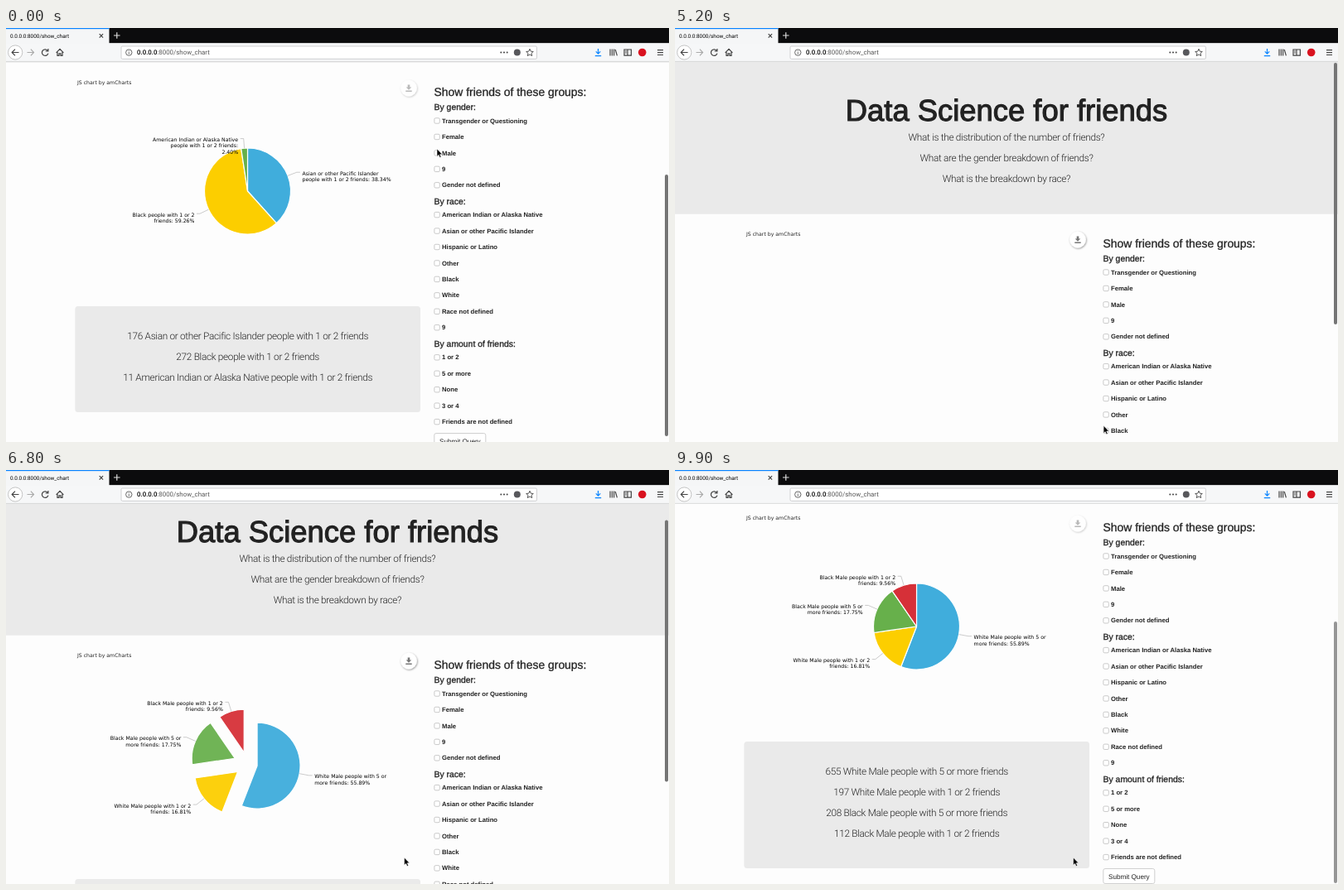
An HTML page that plays this animation: 800x500 px, repeating every 10 s.

```html
<!DOCTYPE html>
<html lang="en">
<head>
<meta charset="utf-8">
<title>Data Science for friends</title>
<style>
  html, body { margin: 0; width: 100%; height: 100%; overflow: hidden; background: #fff; }
  svg { display: block; width: 100%; height: 100%; }
  text { font-family: "Liberation Sans", Arial, sans-serif; fill: #222; text-rendering: geometricPrecision; }
  .medium { stroke: #222; stroke-width: .3px; }
  .title { font-size: 36.4px; stroke-width: 1.1px; }
  .bold { font-size: 7.7px; font-weight: 700; }
  .light { font: 300 11.8px Roboto, sans-serif; letter-spacing: -.3px; text-anchor: middle; }
  .chart { font: 6.2px "DejaVu Sans", Verdana, sans-serif; fill: #000; }
  .ui { font-family: Roboto, sans-serif; fill: #000; }
  .icon { fill: none; stroke: #444; stroke-width: 1.2; }
</style>
</head>
<body>
<svg id="stage" viewBox="0 0 800 500">
  <defs>
    <clipPath id="view"><rect y="40" width="800" height="460"/></clipPath>
    <clipPath id="chartArea"><rect x="83" y="241" width="417" height="278"/></clipPath>
    <filter id="shadow" x="-30%" y="-30%" width="160%" height="160%">
      <feDropShadow dx=".7" dy=".9" stdDeviation=".8" flood-opacity=".45"/>
    </filter>
  </defs>
  <rect width="800" height="500" fill="#fdfdfd"/>
  <g clip-path="url(#view)"><g id="page"></g></g>
  <rect id="thumb" x="795" width="4" height="316" rx="2" fill="#757575"/>

  <g id="browser">
    <rect width="800" height="18.5" fill="#0c0c0d"/>
    <rect width="124.5" height="19" fill="#f5f6f7"/>
    <rect width="124.5" height="1.2" fill="#0a84ff"/>
    <rect y="18.3" width="800" height="22" fill="#f6f7f8"/>
    <path d="M0 40.4H800" stroke="#cfcfcf" stroke-width=".7"/>
    <text class="ui" x="5" y="11.8" font-size="6.42">0.0.0.0:8000/show_chart</text>
    <path class="icon" d="M112.7 7.2l4.4 4.4m0-4.4l-4.4 4.4" stroke-width=".9"/>
    <path class="icon" d="M130 9h7.6M133.8 5.2v7.6" style="stroke:#ddd"/>
    <circle cx="11.2" cy="29.5" r="8.6" fill="#fff" stroke="#b5b5b5" stroke-width=".8"/>
    <path class="icon" d="M15.5 29.5H7.2m3.8-3.8l-3.8 3.8 3.8 3.8"/>
    <path class="icon" d="M25.5 29.5h8m-3.6-3.8l3.6 3.8-3.6 3.8" style="stroke:#aaa"/>
    <path class="icon" d="M50.2 27.3a3.8 3.8 0 1 0 .7 3.3M50.9 25v3h-3.2"/>
    <path class="icon" d="M60.6 29.8l4.4-4.4 4.4 4.4M62 29v4.4h2v-2.6h2v2.6h2V29"/>
    <rect x="139" y="22" width="501.5" height="15.4" rx="1.6" fill="#fff" stroke="#c5c5c7" stroke-width=".8"/>
    <g class="icon" style="stroke-width:.8"><circle cx="148.3" cy="29.6" r="3.7"/><path d="M148.3 29.1v2.6m0-4.3v.9"/></g>
    <text class="ui" x="158" y="32.4" font-size="7.87"><tspan font-weight="500">0.0.0.0</tspan><tspan fill="#555">:8000/show_chart</tspan></text>
    <path d="M597.3 29.6h.01M601 29.6h.01M604.7 29.6h.01" stroke="#444" stroke-width="2" stroke-linecap="round"/>
    <circle cx="616.8" cy="29.5" r="4" fill="#58585c"/>
    <path class="icon" style="stroke-width:.9" d="M632 25.3l1.3 2.9 3 .3-2.3 2 .7 3.1-2.7-1.6-2.7 1.6.7-3.1-2.3-2 3-.3z"/>
    <path class="icon" style="stroke:#0a84ff" d="M714.5 25v6m-2.7-2.6l2.7 2.7 2.7-2.7M710.8 33.6h7.4"/>
    <path class="icon" d="M729 25.6v8M731.4 25.6v8M733.6 25.6v8M735.2 26l2.2 7.4"/>
    <path class="icon" d="M746 26h8.4v7.2H746zM750 26v7.2M747.2 28h1.6m-1.6 2h1.6"/>
    <circle cx="767.7" cy="29.5" r="4.8" fill="#d9121f"/>
    <path class="icon" d="M786 26.7h7m-7 2.9h7m-7 2.9h7"/>
  </g>
  <path id="cursor" d="M0 0V9.2L2.1 7.3 3.5 10.5 5.1 9.8 3.7 6.7H6.5Z" fill="#000" stroke="#fff" stroke-width=".6"/>
</svg>

<script>
const LOOP = 10000, STEP = 100, RELOAD = 5000;
const PIE = { x: 291.5, y: 380, r: 52, label: 63.6 };
const BLUE = '#40addc', YELLOW = '#fcce00', GREEN = '#67b04b', RED = '#d63038';
const $ = id => document.getElementById(id);

function add(parent, tag, attrs = {}, content = '') {
  const node = document.createElementNS('http://www.w3.org/2000/svg', tag);
  for (const key in attrs) node.setAttribute(key, attrs[key]);
  node.textContent = content;
  return parent.appendChild(node);
}
const write = (parent, x, y, cls, content, more = {}) =>
  add(parent, 'text', { x, y, class: cls, ...more }, content);

// Interpolates rows of [time, ...values], holding both ends.
function track(rows, time, ease = u => u) {
  const next = rows.findIndex(row => row[0] > time);
  if (next < 0) return rows[rows.length - 1].slice(1);
  if (next === 0) return rows[0].slice(1);
  const a = rows[next - 1], b = rows[next];
  const u = ease((time - a[0]) / (b[0] - a[0]));
  return a.slice(1).map((v, i) => v + (b[i + 1] - v) * u);
}
const smooth = u => u * u * (3 - 2 * u);

function bounce(u) {
  if (u <= 0) return 0;
  if (u >= 1) return 1;
  const k = 7.5625, d = 2.75;
  if (u < 1 / d) return k * u * u;
  if (u < 2 / d) return k * (u - 1.5 / d) ** 2 + .75;
  if (u < 2.5 / d) return k * (u - 2.25 / d) ** 2 + .9375;
  return k * (u - 2.625 / d) ** 2 + .984375;
}

const page = $('page');

// Header
add(page, 'rect', { y: 40, width: 800, height: 184.7, fill: '#eaeaea' });
write(page, 400, 111.5, 'medium title', 'Data Science for friends', { 'text-anchor': 'middle' });
['What is the distribution of the number of friends?',
 'What are the gender breakdown of friends?',
 'What is the breakdown by race?']
  .forEach((line, i) => write(page, 400, 136 + 25 * i, 'light', line));

// Query form
const boxes = {};
function formGroup(title, headY, firstY, labels) {
  write(page, 516.6, headY, 'medium', title, { 'font-size': 10.4 });
  labels.forEach((label, i) => {
    const y = firstY + 19.45 * i;
    add(page, 'rect', { x: 516.9, y: y - 3.2, width: 6.4, height: 6.4, rx: 1.4, fill: '#fff', stroke: '#b4b4b4', 'stroke-width': .7 });
    const mark = add(page, 'g', { visibility: 'hidden' });
    add(mark, 'rect', { x: 516.6, y: y - 3.5, width: 7, height: 7, rx: 1.5, fill: '#1685f5' });
    add(mark, 'path', { d: `M518.2 ${y + .2}l1.4 1.6 2.5-3.6`, fill: 'none', stroke: '#fff', 'stroke-width': 1 });
    boxes[label] = mark;
    write(page, 526, y + 2.6, 'bold', label);
  });
}
write(page, 516.6, 264.5, 'medium', 'Show friends of these groups:', { 'font-size': 13.9 });
formGroup('By gender:', 282, 295,
  ['Transgender or Questioning', 'Female', 'Male', '9', 'Gender not defined']);
formGroup('By race:', 395.6, 408.6,
  ['American Indian or Alaska Native', 'Asian or other Pacific Islander', 'Hispanic or Latino',
   'Other', 'Black', 'White', 'Race not defined', '9']);
formGroup('By amount of friends:', 567.6, 580.8,
  ['1 or 2', '5 or more', 'None', '3 or 4', 'Friends are not defined']);
add(page, 'rect', { x: 516.8, y: 672.5, width: 62, height: 18, rx: 2.3, fill: '#fff', stroke: '#c4c4c4', 'stroke-width': .8 });
write(page, 523, 684.7, '', 'Submit Query', { 'font-size': 8.15 });

// One query result: pie chart plus summary box
function result(slices, summary, boxHeight) {
  const root = add(page, 'g');
  const chart = add(root, 'g', { 'clip-path': 'url(#chartArea)' });
  let from = 0;
  const parts = slices.map(([percent, color, lines]) => {
    const to = from + percent / 100;
    const dir = turn => [Math.sin(turn * 2 * Math.PI), -Math.cos(turn * 2 * Math.PI)];
    const at = (turn, r) => dir(turn).map((v, i) => (i ? PIE.y : PIE.x) + v * r);
    const mid = (from + to) / 2, side = mid < .5 ? 1 : -1;
    const group = add(chart, 'g');
    const wedge = add(group, 'path', {
      d: `M${PIE.x} ${PIE.y}L${at(from, PIE.r)}A${PIE.r} ${PIE.r} 0 ${+(percent > 50)} 1 ${at(to, PIE.r)}Z`,
      fill: color, stroke: '#fff', 'stroke-width': 1.2, 'stroke-linejoin': 'round'
    });
    const [x, y] = at(mid, PIE.label);
    add(group, 'path', { d: `M${at(mid, PIE.r)}L${x} ${y}h${side * 4}`, fill: 'none', stroke: '#aaa', 'stroke-width': .6 });
    lines.forEach((line, i) => write(group, x + side * 6.6, y + 3.6 + 7.2 * i, 'chart', line,
      { 'text-anchor': side > 0 ? 'start' : 'end' }));
    from = to;
    return { group, wedge, dir: dir(mid) };
  });
  add(root, 'rect', { x: 83.4, y: 519, width: 416.6, height: boxHeight, rx: 3.5, fill: '#eaeaea' });
  summary.forEach((line, i) => write(root, 291.7, 558.6 + 25 * i, 'light', line));
  return { root, parts };
}

const before = result([
  [38.34, BLUE, ['Asian or other Pacific Islander', 'people with 1 or 2 friends: 38.34%']],
  [59.26, YELLOW, ['Black people with 1 or 2', 'friends: 59.26%']],
  [2.40, GREEN, ['American Indian or Alaska Native', 'people with 1 or 2 friends:', '2.40%']]
], [
  '176 Asian or other Pacific Islander people with 1 or 2 friends',
  '272 Black people with 1 or 2 friends',
  '11 American Indian or Alaska Native people with 1 or 2 friends'
], 128);

const after = result([
  [55.89, BLUE, ['White Male people with 5 or', 'more friends: 55.89%']],
  [16.81, YELLOW, ['White Male people with 1 or 2', 'friends: 16.81%']],
  [17.75, GREEN, ['Black Male people with 5 or', 'more friends: 17.75%']],
  [9.56, RED, ['Black Male people with 1 or 2', 'friends: 9.56%']]
], [
  '655 White Male people with 5 or more friends',
  '197 White Male people with 1 or 2 friends',
  '208 Black Male people with 5 or more friends',
  '112 Black Male people with 1 or 2 friends'
], 153);

write(page, 86, 250.6, 'chart', 'JS chart by amCharts', { opacity: .85 });
const menu = add(page, 'g');
add(menu, 'circle', { cx: 486, cy: 255.6, r: 9.8, fill: '#fff', filter: 'url(#shadow)' });
add(menu, 'path', { d: 'M484.7 251.6h2.6v2.8h2L486 257.7l-3.3-3.3h2zM482.3 258.4h7.4v1.6h-7.4z', fill: '#777' });

// Timeline
const CURSOR = [
  [0, 520, 146], [900, 520, 146], [1700, 520, 299], [2050, 520, 299], [2300, 521, 320.5],
  [3000, 521, 320.5], [3500, 520, 394], [3750, 520, 394], [3950, 520, 413], [4200, 520, 413],
  [4600, 537, 487], [5000, 537, 487], [5500, 480.5, 468]
];
const SCROLL = [[0, 0], [6100, 0], [6400, 18], [6500, 22], [6700, 25], [7900, 25], [8100, 120], [8300, 191]];
const MENU = [[8100, 1], [8700, .5]];
const CLICKS = { 'Male': 500, 'Black': 1900, 'White': 2600, '1 or 2': 3600, '5 or more': 4050 };
const SLICE_START = [5186, 5227, 5278, 5340], SLICE_TIME = 1860, SLICE_DISTANCE = 268;

function draw(time) {
  const loaded = time >= RELOAD;
  const scroll = loaded ? track(SCROLL, time)[0] : 183;
  page.setAttribute('transform', `translate(0 ${-scroll})`);
  $('thumb').setAttribute('y', 42 + .738 * scroll);
  $('thumb').setAttribute('opacity', time >= 9900 ? .75 : 1);
  $('cursor').setAttribute('transform', `translate(${track(CURSOR, time, smooth)})`);
  menu.setAttribute('opacity', loaded ? track(MENU, time)[0] : .5);
  before.root.setAttribute('display', loaded ? 'none' : 'inline');
  after.root.setAttribute('display', loaded ? 'inline' : 'none');
  for (const label in CLICKS)
    boxes[label].setAttribute('visibility', !loaded && time >= CLICKS[label] ? 'visible' : 'hidden');
  after.parts.forEach(({ group, wedge, dir }, i) => {
    const shown = bounce((time - SLICE_START[i]) / SLICE_TIME);
    group.setAttribute('transform', `translate(${dir.map(v => v * SLICE_DISTANCE * (1 - shown))})`);
    group.setAttribute('display', shown > 0 ? 'inline' : 'none');
    wedge.setAttribute('opacity', shown);
  });
}

function tick() {
  draw(Math.floor(performance.now() % LOOP / STEP) * STEP);
  requestAnimationFrame(tick);
}
tick();
</script>
</body>
</html>
```
